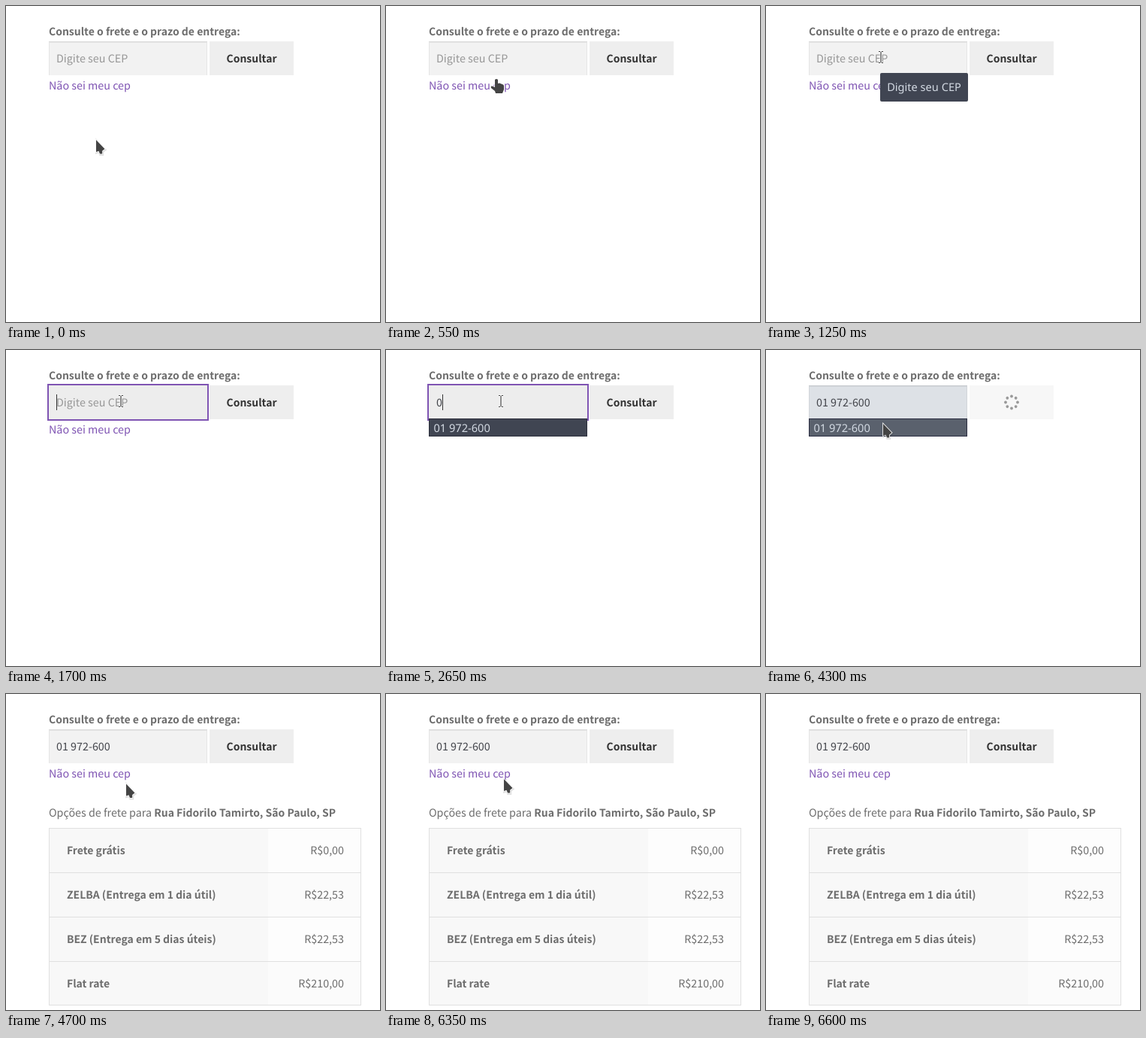
Animation of 498x420 px, one loop 6.9 s. Source, as an HTML page:

```html
<!DOCTYPE html>
<html lang="pt-BR">
<head>
<meta charset="utf-8">
<title>Consulta de frete</title>
<style>
  html, body { margin: 0; width: 100%; height: 100%; overflow: hidden; background: #fff; }
  svg { display: block; }
  text {
    font: 14.32px "Noto Sans CJK JP", "Noto Sans CJK SC", "Noto Sans CJK KR", "Noto Sans CJK", "Open Sans", sans-serif;
    text-rendering: geometricPrecision;
    white-space: pre;
    fill: #6d6d6d;
  }
  .bold { font-weight: 600; font-size: 13.98px; }
  .system { font: 14.6px "Noto Sans", "Open Sans", sans-serif; fill: #d3dae3; }
</style>
</head>
<body>
<svg width="498" height="420" viewBox="0 0 498 420">
  <text class="bold" x="57" y="39">Consulte o frete e o prazo de entrega:</text>

  <rect id="field" x="57" y="47" width="211" height="45"/>
  <g id="inset" fill="none" stroke="#000">
    <path d="M57 47.5H268" stroke-opacity=".1"/>
    <path d="M57 48.5H268M57.5 49V92M267.5 49V92" stroke-opacity=".05"/>
  </g>
  <rect id="focus" x="56" y="46" width="213" height="47" fill="none" stroke="#7f54b3" stroke-width="2"/>
  <text id="value" x="67" y="75"></text>
  <rect id="caret" y="59" width="1" height="21" fill="#333"/>

  <rect id="button" x="271" y="47" width="112" height="45"/>
  <text id="buttonText" class="bold" x="327" y="75" text-anchor="middle" style="fill:#333">Consultar</text>
  <g id="spinner" fill="#999"></g>

  <text x="57" y="111" style="fill:#7f54b3">Não sei meu cep</text>

  <g id="results">
    <text x="57" y="163">Opções de frete para <tspan class="bold">Rua Fidorilo Tamirto, São Paulo, SP</tspan></text>
    <rect x="57" y="178" width="292" height="236" fill="#f8f8f8"/>
    <g id="rows"></g>
    <rect x="57.5" y="178.5" width="415" height="235" fill="none" stroke="#e0e0e0"/>
  </g>

  <g id="dropdown">
    <rect id="option" x="57.5" y="91.5" width="210" height="23"/>
    <text class="system" x="63.5" y="109">01 972-600</text>
  </g>
  <g id="tooltip">
    <rect x="152" y="89" width="117" height="38" rx="2" fill="#404552"/>
    <text class="system" x="210.5" y="113" text-anchor="middle">Digite seu CEP</text>
  </g>

  <g id="cursor">
    <g id="arrow">
      <path d="M0 0V16L3.5 14.8L5 18.5H8.2V14.5L11.5 12Z" transform="translate(.5 1)" fill="none" stroke="#000" stroke-opacity=".12" stroke-width="3"/>
      <path d="M0 0V16L3.5 14.8L5 18.5H8.2V14.5L11.5 12Z" fill="#444" stroke="#fff" stroke-width="1.6" paint-order="stroke"/>
    </g>
    <path id="hand" d="M-3 1Q-1-1 1 1V6L3 5.5L8 7.5Q9 8 9 9.5V14L7 19H-2L-3 16L-8 12Q-9 9-6.5 9.5L-3 11Z" fill="#444" stroke="#fff" stroke-width="1.6" paint-order="stroke"/>
    <g id="beam" fill="none">
      <path d="M-3-7.5H3M0-7V7M-3 7.5H3" stroke="#fff" stroke-opacity=".7" stroke-width="3"/>
      <path d="M-3-7.5H-.8M.8-7.5H3M0-7V7M-3 7.5H-.8M.8 7.5H3" stroke="#444" stroke-width="1.2"/>
    </g>
  </g>
</svg>
<script>
const LOOP = 6900, STEP = 50, CEP = "01 972-600";
const $ = id => document.getElementById(id);
const show = (id, on) => $(id).setAttribute("display", on ? "inline" : "none");
const set = (id, attrs) => Object.entries(attrs).forEach(([k, v]) => $(id).setAttribute(k, v));

// Pointer path: time, x, y
const PATH = [
  [300, 120, 178], [350, 122, 174], [450, 137, 138], [550, 148, 97],
  [650, 152, 75], [700, 153, 68], [3750, 153, 68], [3800, 153, 70],
  [4050, 156, 98], [4500, 156, 98], [4700, 160, 119.5], [6300, 160, 119.5],
  [6350, 157, 113], [6400, 148, 97], [6450, 130, 72], [6550, 67, 2], [6600, 45, -30]
];

const RATES = [
  ["Frete grátis", "R$0,00"],
  ["ZELBA (Entrega em 1 dia útil)", "R$22,53"],
  ["BEZ (Entrega em 5 dias úteis)", "R$22,53"],
  ["Flat rate", "R$210,00"]
];

$("rows").innerHTML = RATES.map(([name, price], i) => {
  const y = 178 + 59 * i;
  return `<rect x="349" y="${y}" width="124" height="59" fill="${i % 2 ? "#fbfbfb" : "#fdfdfd"}"/>
    <path d="M57 ${y + .5}H473" stroke="#e0e0e0"/>
    <text class="bold" x="81" y="${y + 35}">${name}</text>
    <text x="450" y="${y + 35}" text-anchor="end">${price}</text>`;
}).join("");

$("spinner").innerHTML = Array.from({ length: 8 }, (_, i) =>
  `<circle cy="-8" r="1.9" transform="rotate(${45 * i})"/>`).join("");

function pointerAt(t) {
  const next = PATH.findIndex(p => p[0] > t);
  if (next < 1) return (next ? PATH.at(-1) : PATH[0]).slice(1);
  const [t0, x0, y0] = PATH[next - 1], [t1, x1, y1] = PATH[next];
  const k = (t - t0) / (t1 - t0);
  return [x0 + (x1 - x0) * k, y0 + (y1 - y0) * k];
}

function pointerShape(t, x, y) {
  if (t >= 2700 && t < 4350) return "arrow";
  if (x >= 57 && x < 268 && y >= 47 && y < 92) return "beam";
  if (x >= 57 && x < 167 && y >= 96 && y < 112) return "hand";
  return "arrow";
}

function draw(time) {
  const t = Math.floor(time / STEP) * STEP;
  const within = (from, to) => t >= from && t < to;
  const hover = within(4000, 4350);
  const focused = within(1700, 4250);
  const loading = within(4250, 4400);
  const typed = t < 2600 ? "" : t < 3100 ? "0" : t < 4000 ? "01" : CEP;

  $("value").textContent = typed || "Digite seu CEP";
  $("value").style.fill = typed ? "#43454b" : "#979797";
  set("field", { fill: within(4000, 4400) ? "#dde1e6" : focused ? "#ededed" : "#f2f2f2" });
  show("inset", !focused);
  show("focus", focused);
  show("caret", within(1700, 2900) || within(3100, 4000));
  set("caret", { x: 67 + 8 * typed.length });

  set("button", { fill: loading ? "#f7f7f7" : "#eee" });
  show("buttonText", !loading);
  show("spinner", loading);
  set("spinner", { transform: `translate(327 69.5) rotate(${(t - 4300) * .36})` });

  show("tooltip", within(1250, 1700));
  show("dropdown", within(2650, 4350));
  set("option", { fill: hover ? "#5a616d" : "#404552", stroke: hover ? "#2b2e42" : "#2d303d" });
  show("results", t >= 4400);

  const [x, y] = pointerAt(t), shape = pointerShape(t, x, y);
  for (const id of ["arrow", "hand", "beam"]) show(id, id === shape);
  show("cursor", t < 6600);
  set("cursor", { transform: `translate(${x} ${y})` });
}

const start = performance.now();
function tick() {
  draw((performance.now() - start) % LOOP);
  requestAnimationFrame(tick);
}
tick();
</script>
</body>
</html>
```
